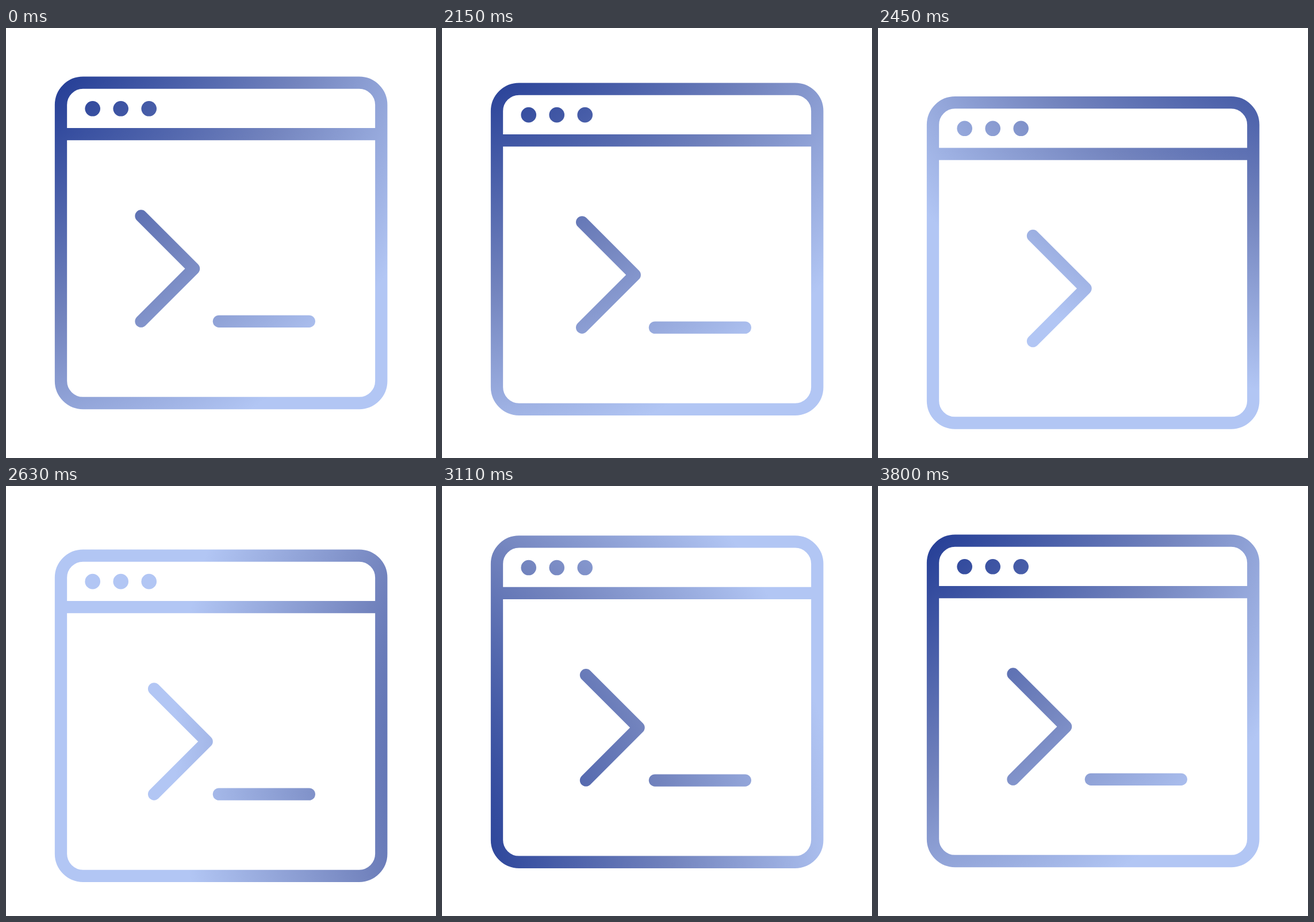
Animation, 748 px wide and 748 px high, one loop 3.83 s. Source, as an HTML page with a canvas:

```html
<!DOCTYPE html>
<html lang="en">
<head>
<meta charset="utf-8">
<title>Terminal window</title>
<style>
  html, body { margin: 0; width: 100%; height: 100%; overflow: hidden; background: #fff; }
  canvas { display: block; width: 748px; height: 748px; }
</style>
</head>
<body>
<canvas id="stage" width="748" height="748"></canvas>
<script>
const ctx = document.getElementById('stage').getContext('2d');
const LOOP = 3830, HOLD = 2000, STEP = 30, STEPS = 60;
const SHIFT = 34.5;   // travel of the window and of the prompt
const BLINK = 9;      // steps between cursor toggles

// Cubic easing with flat ends; a and b are the x positions of the handles.
function ease(x, a, b) {
  if (x <= 0) return 0;
  if (x >= 1) return 1;
  let lo = 0, hi = 1;
  for (let i = 0; i < 30; i++) {
    const t = (lo + hi) / 2, u = 1 - t;
    if (3 * a * t * u * u + 3 * b * t * t * u + t * t * t < x) lo = t;
    else hi = t;
  }
  return lo * lo * (3 - 2 * lo);
}

function dropAt(k) {
  return SHIFT * (k < 15 ? ease(k / 15, 0.3, 0.57) : 1 - ease((k - 15) / 30, 0.25, 0.25));
}

function promptAt(k) {
  return SHIFT * (1 - Math.cos(Math.PI * k / 15)) / 2;
}

// The gradient's centre makes one clockwise turn around the window.
function paintAt(k) {
  const angle = (221 + 360 * ease(k / STEPS, 0.357, 0.38)) * Math.PI / 180;
  const x = 470 + 845 * Math.cos(angle), y = 390 + 845 * Math.sin(angle);
  const g = ctx.createRadialGradient(x, y, 340, x, y, 1020);
  g.addColorStop(0, '#203a94');
  g.addColorStop(0.56, '#7384be');
  g.addColorStop(1, '#b2c6f4');
  return g;
}

function line(...points) {
  ctx.beginPath();
  points.forEach(([x, y]) => ctx.lineTo(x, y));
  ctx.stroke();
}

function draw(k) {
  const dy = dropAt(k), dx = promptAt(k);
  ctx.fillStyle = '#fff';
  ctx.fillRect(0, 0, 748, 748);
  ctx.fillStyle = ctx.strokeStyle = paintAt(k);
  ctx.lineWidth = 21.3;
  ctx.lineJoin = 'round';

  ctx.lineCap = 'butt';
  ctx.beginPath();
  ctx.roundRect(95.5, 95.2 + dy, 557.3, 557.3, 38.5);
  ctx.stroke();
  line([96, 184.7 + dy], [652, 184.7 + dy]);

  for (const x of [150.7, 199.7, 248.7]) {
    ctx.beginPath();
    ctx.arc(x, 140.3 + dy, 13.3, 0, 2 * Math.PI);
    ctx.fill();
  }

  ctx.lineCap = 'round';
  line([235 + dx, 327 + dy], [326.6 + dx, 418.6 + dy], [235 + dx, 510.2 + dy]);
  if (Math.floor(k / BLINK) % 2 === 0) line([370.4, 510.3 + dy], [527.3, 510.3 + dy]);
}

const start = performance.now();
function tick() {
  const t = (performance.now() - start) % LOOP;
  draw(Math.min(STEPS, Math.max(0, Math.floor((t - HOLD) / STEP))));
  requestAnimationFrame(tick);
}
tick();
</script>
</body>
</html>
```
